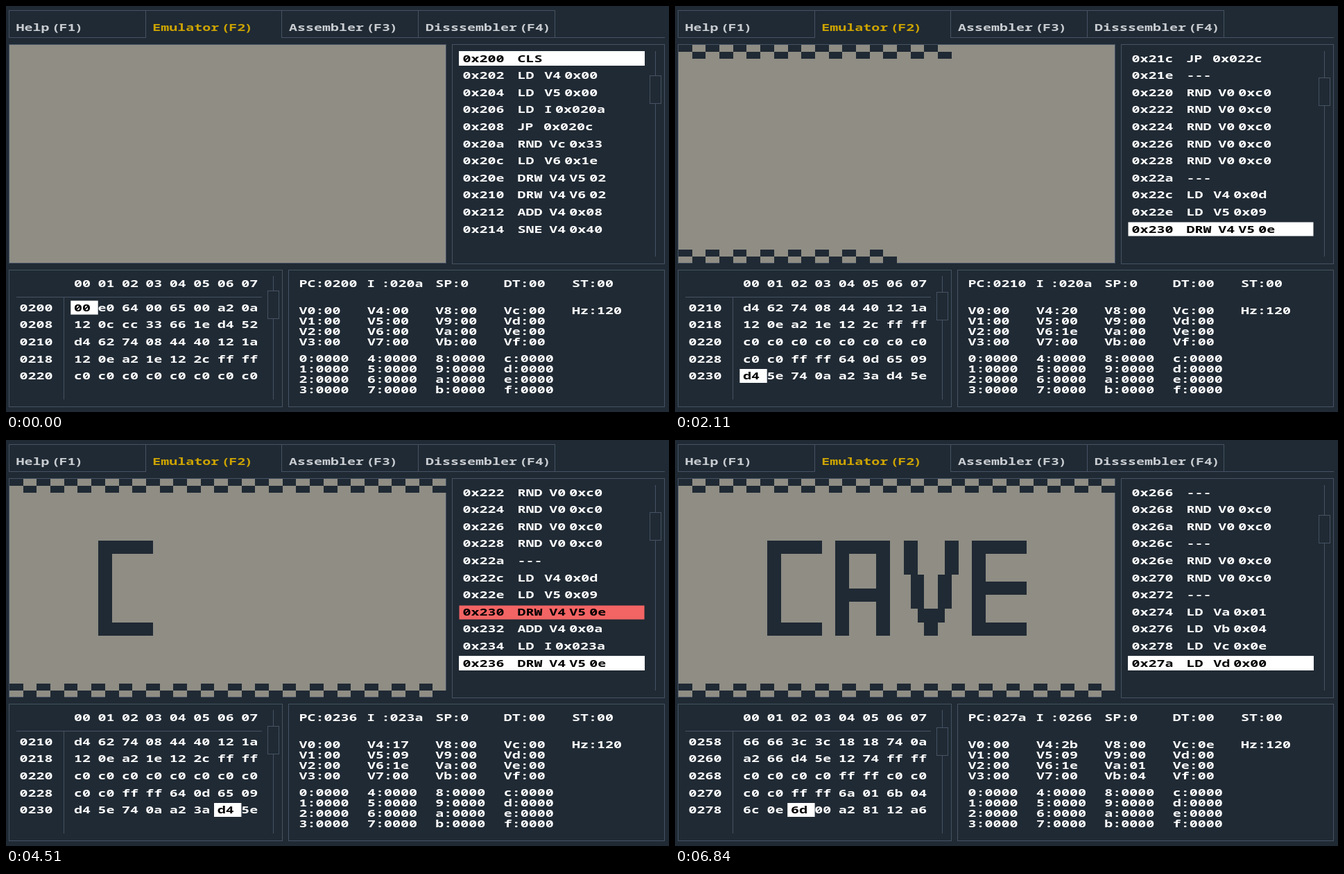
Animation of 956 by 585 pixels, one loop 6920 ms. Source, as an HTML page with a canvas:

```html
<!DOCTYPE html>
<html lang="en">
<head>
<meta charset="utf-8">
<title>Emulator</title>
<style>
  html, body { margin: 0; width: 956px; height: 585px; overflow: hidden; background: #202a34; }
  canvas { display: block; }
</style>
</head>
<body>
<canvas id="stage" width="956" height="585"></canvas>
<script>
const ctx = document.getElementById('stage').getContext('2d');
const LOOP = 6920, START = 0x200, BREAKPOINT = 0x230;
const BG = '#202a34', LINE = '#465264', TEXT = '#fff', GREY = '#8f8d84',
      GOLD = '#cda400', TAB = '#c9cdd1', RED = '#f36464', BLACK = '#000';
const LIST_ROWS = 11, MEM_ROWS = 5, ROW = 24.6;

const program = `
  00e0 6400 6500 a20a 120c cc33 661e d452
  d462 7408 4440 121a 120e a21e 122c ffff
  c0c0 c0c0 c0c0 c0c0 c0c0 ffff 640d 6509
  d45e 740a a23a d45e 1248 ffff c3c3 c3c3
  c3ff ffc3 c3c3 c3c3 740a a250 d45e 125e
  c3c3 c3c3 c366 6666 6666 3c3c 1818 740a
  a266 d45e 1274 ffff c0c0 c0c0 ffff c0c0
  c0c0 ffff 6a01 6b04 6c0e 6d00 a281 12a6`.trim().split(/\s+/).map(w => parseInt(w, 16));

const hex = (n, len) => n.toString(16).padStart(len, '0');
const word = addr => program[(addr - START) >> 1];
const byte = addr => addr & 1 ? word(addr) & 255 : word(addr) >> 8;

function decode(op) {
  return { kind: op >> 12, x: op >> 8 & 15, y: op >> 4 & 15, n: op & 15, kk: op & 255, nnn: op & 4095 };
}

function disassemble(op) {
  const { kind, x, y, n, kk, nnn } = decode(op);
  const line = (name, args) => name.padEnd(5) + args;
  const reg = r => 'V' + r.toString(16);
  const value = `${reg(x)} 0x${hex(kk, 2)}`, target = '0x' + hex(nnn, 4);
  switch (kind) {
    case 0x0: return 'CLS';
    case 0x1: return line('JP', target);
    case 0x3: return line('SE', value);
    case 0x4: return line('SNE', value);
    case 0x6: return line('LD', value);
    case 0x7: return line('ADD', value);
    case 0xa: return line('LD', 'I ' + target);
    case 0xc: return line('RND', value);
    case 0xd: return line('DRW', `${reg(x)} ${reg(y)} ${hex(n, 2)}`);
    default: return '---';
  }
}

// Debugger state and the actions the user takes
const machine = {
  pc: START, i: START + 10, v: Array(16).fill(0), pixels: new Set(),
  cursor: START, listTop: START, memTop: START, broken: false
};

function moveTo(addr) {
  const scroll = (top, at, size, rows) => Math.max(at - (rows - 1) * size, Math.min(top, at));
  machine.cursor = addr;
  machine.listTop = scroll(machine.listTop, addr, 2, LIST_ROWS);
  machine.memTop = scroll(machine.memTop, addr & ~7, 8, MEM_ROWS);
}

function step() {
  const { kind, x, y, n, kk, nnn } = decode(word(machine.pc)), { v, pixels } = machine;
  machine.pc += 2;
  if (kind === 0x0) pixels.clear();
  if (kind === 0x1) machine.pc = nnn;
  if (kind === 0x4 && v[x] !== kk) machine.pc += 2;
  if (kind === 0x6) v[x] = kk;
  if (kind === 0x7) v[x] = v[x] + kk & 255;
  if (kind === 0xa) machine.i = nnn;
  if (kind === 0xd) {
    for (let r = 0; r < n; r++) for (let c = 0; c < 8; c++) {
      if (!(byte(machine.i + r) & 128 >> c)) continue;
      const p = (v[y] + r) * 64 + v[x] + c;
      if (!pixels.delete(p)) pixels.add(p);
    }
  }
  moveTo(machine.pc);
}

const states = [];
const record = time => states.push({ time, ...machine, v: [...machine.v], pixels: new Set(machine.pixels) });
const run = (time, count) => { while (count--) step(); record(time); };
const move = (time, rows) => { moveTo(machine.cursor + rows * 2); record(time); };

record(0);
[1, 4, 4, 5, 4, 5, 4].forEach((count, k) => run(470 + k * 460 / 6, count));
[[1250, 1], [1400, 3], [1490, 4], [1640, 6], [1960, 1], [2110, 1]].forEach(m => move(...m));
machine.broken = true;
record(2510);
[2810, 2970, 3130].forEach(time => move(time, 1));
[1, 4, 5, 4, 5, 4].forEach((count, k) => run(3360 + k * 78, count));
[4130, 4320, 4510, 4670, 4860, 5050, 5280, 5440, 5590, 5750,
  5980, 6130, 6290, 6440, 6640, 6840].forEach(time => run(time, 1));

// Drawing helpers
function box(x, y, w, h, stroke, fill) {
  if (fill) { ctx.fillStyle = fill; ctx.fillRect(x, y, w, h); }
  if (stroke) { ctx.strokeStyle = stroke; ctx.strokeRect(x + .5, y + .5, w - 1, h - 1); }
}

function rule(x, y, w, h) {
  box(x, y, w, h, null, LINE);
}

// Wide face: 12px cells with narrow spaces, brackets and slim capitals
function text(str, x, middle, color = TEXT) {
  ctx.save();
  ctx.translate(x, Math.round(middle + 5.2));
  ctx.scale(4 / 3, 1);
  ctx.fillStyle = color;
  let pen = 0;
  for (const ch of str) {
    const advance = ch === ' ' ? 3.7 : '()'.includes(ch) ? 6.8 : 'IJ'.includes(ch) ? 8 : 9;
    ctx.fillText(ch, pen + advance / 2, 0);
    pen += advance;
  }
  ctx.restore();
}

function slider(x, top, height, y) {
  rule(x, top, 1, height);
  box(x - 8, Math.round(y), 17, 41, LINE, BG);
}

function drawTabs() {
  const edge = k => Math.floor(4.3 + k * 196.8);
  ['Help (F1)', 'Emulator (F2)', 'Assembler (F3)', 'Disssembler (F4)'].forEach((label, k) => {
    const x = edge(k), width = edge(k + 1) - x + 1, active = k === 1;
    box(x, 6, width, 40, LINE);
    if (active) box(x + 1, 45, width - 2, 1, null, BG);
    text(label, 14.5 + k * 196.8, 31, active ? GOLD : TAB);
  });
  rule(791, 45, 159, 1);
}

function drawScreen({ pixels }) {
  const size = 630 / 64, edge = (origin, k) => Math.round(origin + k * size);
  box(4, 55, 631, 316, LINE, GREY);
  for (const p of pixels) {
    const c = p % 64, r = p >> 6, x = edge(5, c), y = edge(56, r);
    box(x, y, edge(5, c + 1) - x, edge(56, r + 1) - y, null, BG);
  }
}

function drawList({ listTop, cursor, pc, broken }) {
  box(643, 55, 307, 317, LINE);
  slider(936, 65, 296, 100.3 + (cursor - START) * .062);
  for (let k = 0; k < LIST_ROWS; k++) {
    const addr = listTop + k * 2, middle = 75.4 + k * ROW, top = Math.round(middle - 10);
    const fill = broken && addr === BREAKPOINT ? RED : addr === cursor ? TEXT : null;
    if (fill) box(653.5, top + .5, 267, 20, null, fill);
    if (addr === pc) box(653, top, 268, 21, TEXT);
    const color = fill ? BLACK : TEXT;
    text('0x' + hex(addr, 3), 658.5, middle, color);
    text(disassemble(word(addr)), 737.5, middle, color);
  }
}

function drawMemory({ memTop, cursor }) {
  box(4, 380, 395, 198, LINE);
  rule(15, 419, 354, 1);
  rule(83, 419, 1, 148);
  slider(385, 389, 178, 410 + (cursor - START) * .033);
  const column = k => 98 + k * 34.45;
  for (let c = 0; c < 8; c++) text(hex(c, 2), column(c), 400);
  for (let r = 0; r < MEM_ROWS; r++) {
    const middle = 434.6 + r * ROW;
    text(hex(memTop + r * 8, 4), 19.5, middle);
    for (let c = 0; c < 8; c++) {
      const addr = memTop + r * 8 + c, active = addr === cursor;
      if (active) box(column(c) - 4.7, middle - 10, 39.4, 20, null, TEXT);
      text(hex(byte(addr), 2), column(c), middle, active ? BLACK : TEXT);
    }
  }
}

function drawRegisters({ pc, i, v }) {
  box(407, 380, 543, 198, LINE);
  const column = k => 422.5 + k * 98.4;
  ['PC:' + hex(pc, 4), 'I  :' + hex(i, 4), 'SP:0', 'DT:00', 'ST:00']
    .forEach((label, k) => text(label, column(k), 400));
  text('Hz:120', column(4), 439);
  for (let k = 0; k < 16; k++) {
    const x = column(k >> 2), y = (k & 3) * 14.75, name = k.toString(16);
    text(`V${name}:${hex(v[k], 2)}`, x, 439.2 + y);
    text(name + ':0000', x, 508.2 + y);
  }
}

const origin = performance.now();

function frame() {
  const time = (performance.now() - origin) % LOOP;
  const state = states.filter(s => s.time <= time).pop();
  box(0, 0, 956, 585, null, BG);
  ctx.font = '600 15px "Noto Sans Mono", "DejaVu Sans Mono", monospace';
  ctx.textAlign = 'center';
  drawTabs();
  [drawScreen, drawList, drawMemory, drawRegisters].forEach(draw => draw(state));
  requestAnimationFrame(frame);
}

frame();
</script>
</body>
</html>
```
